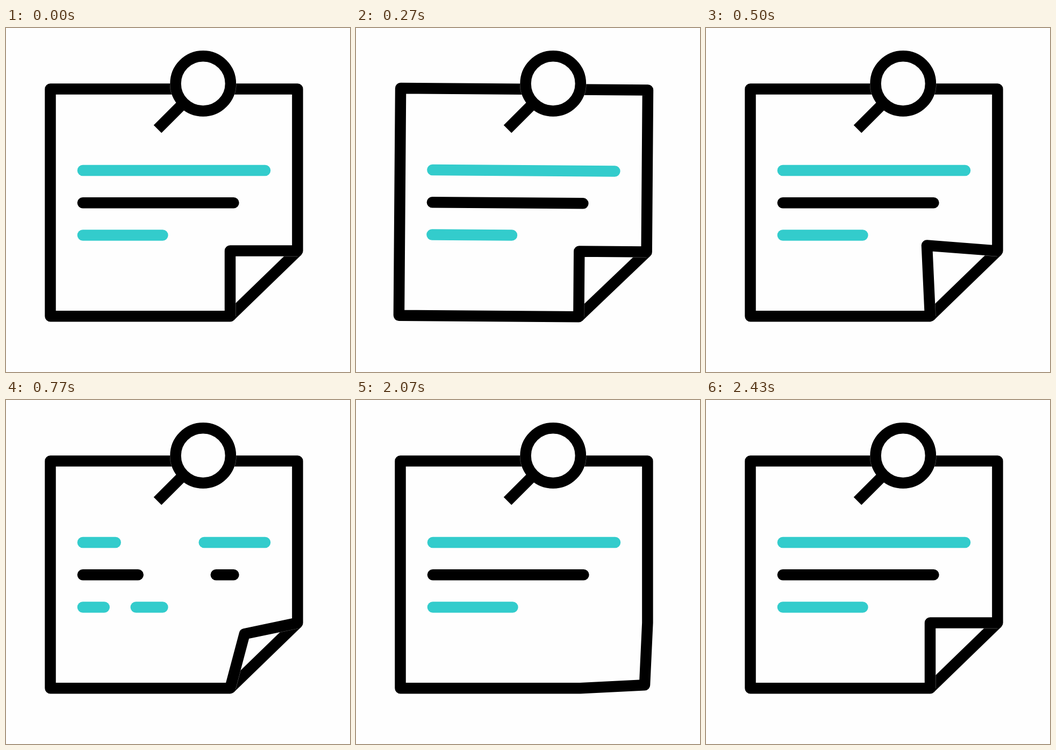
These frames come from a looping animation (640x640 px, 2.5 s). An HTML page with a canvas:

```html
<!DOCTYPE html>
<html lang="en">
<head>
<meta charset="utf-8">
<title>Pinned note</title>
<style>
  html, body { margin: 0; width: 100%; height: 100%; overflow: hidden; background: #fefefe; }
  canvas { display: block; width: 100vw; height: 100vh; }
</style>
</head>
<body>
<canvas id="stage" width="640" height="640"></canvas>
<script>
const ctx = document.getElementById('stage').getContext('2d');
const LOOP = 2500, STROKE = 20.5;
const PAPER = '#fefefe', INK = '#000', TEAL = '#33cccc';
const TIP = [282, 188], HEAD = [366.7, 103.4];
const RIGHT = [542.4, 414.6], BOTTOM = [417, 536.2];

// Keys are [tick, value], at 30 ticks per second.
const SWING = [[1.2, 0], [5, 4], [11.2, -3.5], [14, 0]];
const FOLD_X = [[10.9, 417], [18.1, 407], [32.4, 542.4], [60.5, 542.4], [72.5, 417]];
const FOLD_Y = [[10.9, 414.6], [18.1, 398], [32.4, 535.4], [60.5, 535.4], [72.5, 414.6]];

const LINES = [
  { y: 265, end: 482, color: TEAL, wipe: 18.1, write: 20.3 },
  { y: 325.3, end: 423.4, color: INK, wipe: 16.7, write: 18.9 },
  { y: 385.5, end: 291.4, color: TEAL, wipe: 18.1, write: 19.6 }
];
const LINE_START = 142.9, WIPE_LEN = 8, WRITE_LEN = 10;

function ease(t) {
  t = Math.min(1, Math.max(0, t));
  return t * t * (3 - 2 * t);
}

function track(keys, tick) {
  let value = keys[0][1];
  for (let i = 1; i < keys.length; i++) {
    const [t0, v0] = keys[i - 1], [t1, v1] = keys[i];
    if (tick >= t0) value = v0 + (v1 - v0) * ease((tick - t0) / (t1 - t0));
  }
  return value;
}

function path(points, closed) {
  ctx.beginPath();
  points.forEach(p => ctx.lineTo(p[0], p[1]));
  if (closed) ctx.closePath();
}

function stroke(color, width = STROKE) {
  ctx.strokeStyle = color;
  ctx.lineWidth = width;
  ctx.stroke();
}

function fill() {
  ctx.fillStyle = PAPER;
  ctx.fill();
}

function segment(x0, x1, y, color) {
  path([[x0, y], [x1, y]]);
  stroke(color);
}

function drawLine(line, tick) {
  const len = line.end - LINE_START;
  const wiped = ease((tick - line.wipe) / WIPE_LEN);
  const written = ease((tick - line.write) / WRITE_LEN);
  if (wiped < 1) segment(LINE_START + len * wiped, line.end, line.y, line.color);
  if (written > 0) segment(LINE_START, LINE_START + len * written, line.y, line.color);
}

function drawPage(tick) {
  const fold = [track(FOLD_X, tick), track(FOLD_Y, tick)];
  const page = [[82.5, 113.5], [542.4, 113.5], RIGHT, fold, BOTTOM, [82.5, 536.2]];

  ctx.lineCap = 'butt';
  path([BOTTOM, RIGHT]);
  stroke(INK);

  // Hairline seam between the flap and the edge behind it
  path([RIGHT, fold, BOTTOM]);
  stroke('rgba(255,255,255,.5)', STROKE + 0.8);

  ctx.lineCap = 'round';
  path(page, true);
  fill();
  stroke(INK);
  LINES.forEach(line => drawLine(line, tick));
}

function drawPin() {
  const ring = () => {
    ctx.beginPath();
    ctx.arc(HEAD[0], HEAD[1], 51.2, 0, Math.PI * 2);
  };
  ring();
  stroke('rgba(255,255,255,.5)', STROKE + 0.8);
  path([TIP, [328, 142]]);
  stroke(INK);
  ring();
  fill();
  stroke(INK);
}

function draw(ms) {
  const tick = Math.floor((Math.floor(ms / 10) * 10 + 4) * 0.03);
  ctx.fillStyle = PAPER;
  ctx.fillRect(0, 0, 640, 640);
  ctx.lineJoin = 'round';

  ctx.save();
  ctx.translate(TIP[0], TIP[1]);
  ctx.rotate(track(SWING, tick) * Math.PI / 180);
  ctx.translate(-TIP[0], -TIP[1]);
  drawPage(tick);
  ctx.restore();

  drawPin();
}

const start = performance.now();
function loop() {
  draw((performance.now() - start) % LOOP);
  requestAnimationFrame(loop);
}
loop();
</script>
</body>
</html>
```
